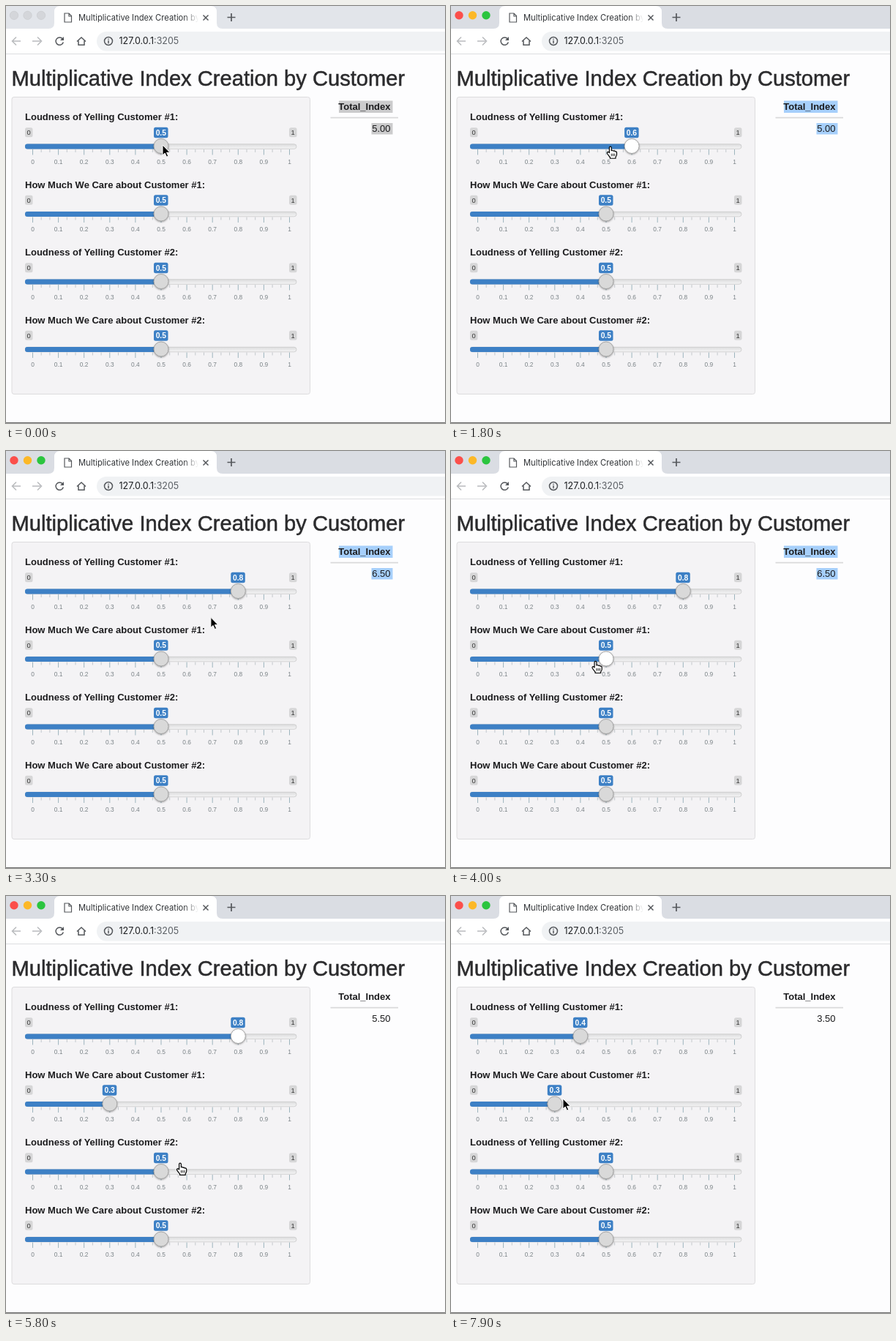
Write an HTML page that moves like this. It is 600 px wide and 570 px high and loops after 8000 ms.

```html
<!DOCTYPE html>
<html lang="en">
<head>
<meta charset="utf-8">
<title>Multiplicative Index Creation by Customer</title>
<style>
  html, body { margin: 0; width: 100%; height: 100%; overflow: hidden; background: #fdfdfe; }
  svg { display: block; width: 600px; height: 570px; font-family: "Liberation Sans", Arial, sans-serif; }
  .ui { font-family: Inter, Roboto, sans-serif; }
  .icon { fill: none; stroke: #55585c; stroke-width: 1.5; }
  .dim { stroke: #b9bbbe; }
  .title { font-size: 29.15px; fill: #2b2b2d; stroke: #2b2b2d; stroke-width: .5; }
  .label { font-size: 13px; font-weight: bold; fill: #1c1c1e; }
  .limit { font-size: 9.4px; fill: #333; text-anchor: middle; }
  .value { font-size: 10.3px; font-weight: bold; fill: #fff; text-anchor: middle; }
  .tick { font-size: 8.4px; fill: #7b8387; text-anchor: middle; }
  .badge { fill: #d6d6d7; }
  .blue { fill: #3d80c5; }
  .cell { font-size: 13px; fill: #1c1c1e; text-anchor: end; }
  .knob { fill: #d9d9d9; stroke: #a6a6a6; filter: drop-shadow(0.5px 1px 1px #0005); }
  .knob.hover { fill: #fff; }
  .strip { fill: #e2e5ea; }
  .active .strip { fill: #dadde3; }
  .light { fill: #d4d6da; stroke: #c6c8cc; stroke-width: .6; }
  .active .light { fill: var(--on); stroke: none; }
  .mark { fill: #cbcbcc; }
  .active .mark { fill: #a6cffb; }
  .cleared .mark { fill: none; }
</style>
</head>
<body>
<svg id="stage" viewBox="0 0 600 570">
  <defs>
    <linearGradient id="fade" gradientUnits="userSpaceOnUse" x1="242" x2="263">
      <stop stop-color="#303336"/><stop offset="1" stop-color="#303336" stop-opacity="0"/>
    </linearGradient>
    <linearGradient id="groove" x2="0" y2="1">
      <stop stop-color="#dcdcdd"/><stop offset="1" stop-color="#f5f5f6"/>
    </linearGradient>
  </defs>

  <rect width="600" height="66" fill="#fff"/>
  <path class="strip" d="M0 0H600V31H296Q288 31 288 23V8Q288 0 280 0H74Q66 0 66 8V23Q66 31 58 31H0Z"/>
  <circle class="light" cx="11" cy="12.8" r="5.7" style="--on:#fb4f4b"/>
  <circle class="light" cx="29.5" cy="12.8" r="5.7" style="--on:#fcb827"/>
  <circle class="light" cx="48" cy="12.8" r="5.7" style="--on:#2bc53f"/>

  <g class="icon">
    <path d="M80 10H86L89.5 13.5V22H80ZM86 10V14H89.5" stroke-width="1.2"/>
    <path d="M269.500 12.500L276.500 19.500M276.500 12.500L269.500 19.500"/>
    <path d="M302.500 15.500H313.500M308 10V21" stroke-width="1.7"/>
    <path class="dim" d="M20 48H9M14 42.500L8.500 48L14 53.500M36 48H47M43 42.500L48.500 48L43 53.500"/>
    <path d="M77.300 44.800A5.200 5.200 0 1 0 78.300 49.500"/>
    <path d="M79 42V47H74Z" fill="#55585c" stroke="none"/>
    <path d="M97 48.500L103 43L109 48.500M99 47.500V53.200H107V47.500"/>
  </g>
  <text class="ui" x="99" y="19.700" font-size="11.200" fill="url(#fade)">Multiplicative Index Creation by</text>
  <rect x="124" y="35" width="500" height="26.500" rx="13.200" fill="#f0f2f4"/>
  <circle class="icon" cx="140" cy="48" r="5.500" stroke-width="1.300"/>
  <path class="icon" d="M140 47V51.200M140 44.700V46"/>
  <text class="ui" x="154.500" y="52.400" font-size="12.500" fill="#1d1f22">127.0.0.1<tspan fill="#5c6166">:3205</tspan></text>
  <path d="M0 65.500H600" stroke="#dcdee0"/>

  <text class="title" x="7.500" y="109">Multiplicative Index Creation by Customer</text>
  <rect x="8" y="124.500" width="407.500" height="406" rx="3" fill="#f4f3f5" stroke="#dddcde"/>
  <g id="sliders"></g>

  <rect class="mark" x="455" y="129.500" width="73.500" height="16.500"/>
  <rect class="mark" x="499.500" y="160" width="29" height="15.500"/>
  <text class="cell" x="525.500" y="142.300" font-weight="bold">Total_Index</text>
  <path d="M443.500 152.700H536" stroke="#d9d9da" stroke-width="1.800"/>
  <text class="cell" id="total" x="525.500" y="172"></text>
  <path d="M0 569.500H600" stroke="#707070"/>

  <g id="pointer" stroke-linejoin="round">
    <path id="arrow" fill="#000" stroke="#fff" d="M0 0V14L3.200 11.100L5.500 16.200L7.800 15.200L5.500 10.300H10Z"/>
    <g id="hand" stroke="#000" stroke-width="1.200">
      <path fill="#fff" d="M-1.400 8.500V1.200Q-1.300 -.2 0 -.2T1.400 1.200V5.500Q2.800 4.300 4 6Q5.400 5 6.500 6.700Q8.600 6 8.700 8.400V11Q8.500 12.600 7.200 14.200V16H-.4V14.500Q-2.300 12.500-4.200 9.500Q-5 7.600-3.300 7.200Q-2.300 7.200-1.400 8.500Z"/>
      <path fill="none" stroke-width=".9" d="M1.500 9.500V13M3.700 9.500V13M5.900 9.500V13"/>
    </g>
  </g>
</svg>
<script>
const LOOP = 8000, STEP = 100, PITCH = 92.5;
const FOCUS = 600, LEAD = 500, LAG = 300;
const $ = id => document.getElementById(id);
const xOf = v => 36.5 + 351 * v;

const labels = [1, 2].flatMap(n => [
  `Loudness of Yelling Customer #${n}:`,
  `How Much We Care about Customer #${n}:`
]);

function scale() {
  let out = '';
  for (let i = 0; i <= 30; i++) {
    const x = xOf(i / 30).toFixed(1), big = i % 3 === 0;
    out += `<path d="M${x} 196V${big ? 203.5 : 200}" stroke="${big ? '#9db4bd' : '#c3c8cc'}"/>`;
    if (big) out += `<text class="tick" x="${x}" y="215.500">${i / 30}</text>`;
  }
  return out;
}

const limit = (x, n) => `
  <rect class="badge" x="${x - 5.2}" y="166.300" width="10.500" height="13" rx="2.500"/>
  <text class="limit" x="${x}" y="176.200">${n}</text>`;

$('sliders').innerHTML = labels.map((label, i) => `
  <g class="slider" transform="translate(0 ${i * PITCH})">
    <text class="label" x="26" y="156.200">${label}</text>
    ${limit(31.2, 0)}${limit(392.2, 1)}${scale()}
    <rect x="26.500" y="188.800" width="370.500" height="6.500" rx="3.200" fill="url(#groove)" stroke="#c9c9ca" stroke-width=".8"/>
    <rect class="blue bar" x="26" y="188.500" height="7" rx="3"/>
    <g class="grip">
      <rect class="blue" x="-10" y="165.800" width="19.500" height="14.500" rx="2.500"/>
      <text class="value" x="-.2" y="176.800"></text>
      <circle class="knob" cy="191.500" r="10"/>
    </g>
  </g>`).join('');

const sliders = [...document.querySelectorAll('.slider')].map(g => ({
  bar: g.querySelector('.bar'), grip: g.querySelector('.grip'),
  value: g.querySelector('.value'), knob: g.querySelector('.knob')
}));

// Each drag moves a slider; dx is the pointer's offset from the knob,
// leave ends the hover, rest ends the pointer's pause after the drag.
const drags = [
  { slider: 0, from: .5, to: .8, start: 1700, end: 2300, dx: -2, y: [191.5, 201.5], leave: 2900, rest: 2900 },
  { slider: 1, from: .5, to: .3, start: 4000, end: 4200, dx: -14.5, y: [287.5, 285], leave: 4400, rest: 4500 },
  { slider: 0, from: .8, to: .4, start: 6260, end: 6660, dx: -7, y: [193, 194], leave: 6500, rest: 7400 }
];

// Pointer stops between the drags: [time, x, y]
const stops = [[0, 214, 190], [FOCUS, 214, 190], [5500, 200, 456], [7900, 153, 277]];
const path = stops.concat(drags.flatMap(d => {
  const x0 = xOf(d.from) + d.dx, x1 = xOf(d.to) + d.dx;
  return [[d.start, x0, d.y[0]], [d.end, x1, d.y[1]], [d.rest, x1, d.y[1]]];
})).sort((a, b) => a[0] - b[0]);

function pointAt(t) {
  const n = path.findIndex(k => k[0] > t);
  if (n < 0) return path[path.length - 1].slice(1);
  const [t0, x0, y0] = path[n - 1], [t1, x1, y1] = path[n];
  const u = (t - t0) / (t1 - t0), e = u * u * (3 - 2 * u);
  return [x0 + (x1 - x0) * e, y0 + (y1 - y0) * e];
}

function valueAt(i, t) {
  const d = drags.filter(d => d.slider === i && d.start <= t).pop();
  if (!d) return .5;
  const u = Math.min(1, (t - d.start) / (d.end - d.start));
  return Math.round(10 * (d.from + (d.to - d.from) * u)) / 10;
}

function totalAt(t) {
  const [a, b, c, d] = sliders.map((s, i) => valueAt(i, t - LAG));
  return 10 * (a * c + b * d);
}

function draw(now) {
  const t = Math.floor(now % LOOP / STEP) * STEP;
  const hover = drags.find(d => t >= d.start - LEAD && t < d.leave);
  sliders.forEach((s, i) => {
    const v = valueAt(i, t);
    s.bar.setAttribute('width', xOf(v) - 26);
    s.grip.setAttribute('transform', `translate(${xOf(v)} 0)`);
    s.value.textContent = v.toFixed(1);
    s.knob.classList.toggle('hover', !!hover && hover.slider === i);
  });
  $('total').textContent = totalAt(t).toFixed(2);
  $('stage').classList.toggle('active', t >= FOCUS);
  $('stage').classList.toggle('cleared', t > drags[1].start);
  $('arrow').style.display = hover ? 'none' : '';
  $('hand').style.display = hover ? '' : 'none';
  $('pointer').setAttribute('transform', `translate(${pointAt(t)})`);
}

const begun = performance.now();
function tick() {
  draw(performance.now() - begun);
  requestAnimationFrame(tick);
}
tick();
</script>
</body>
</html>
```
